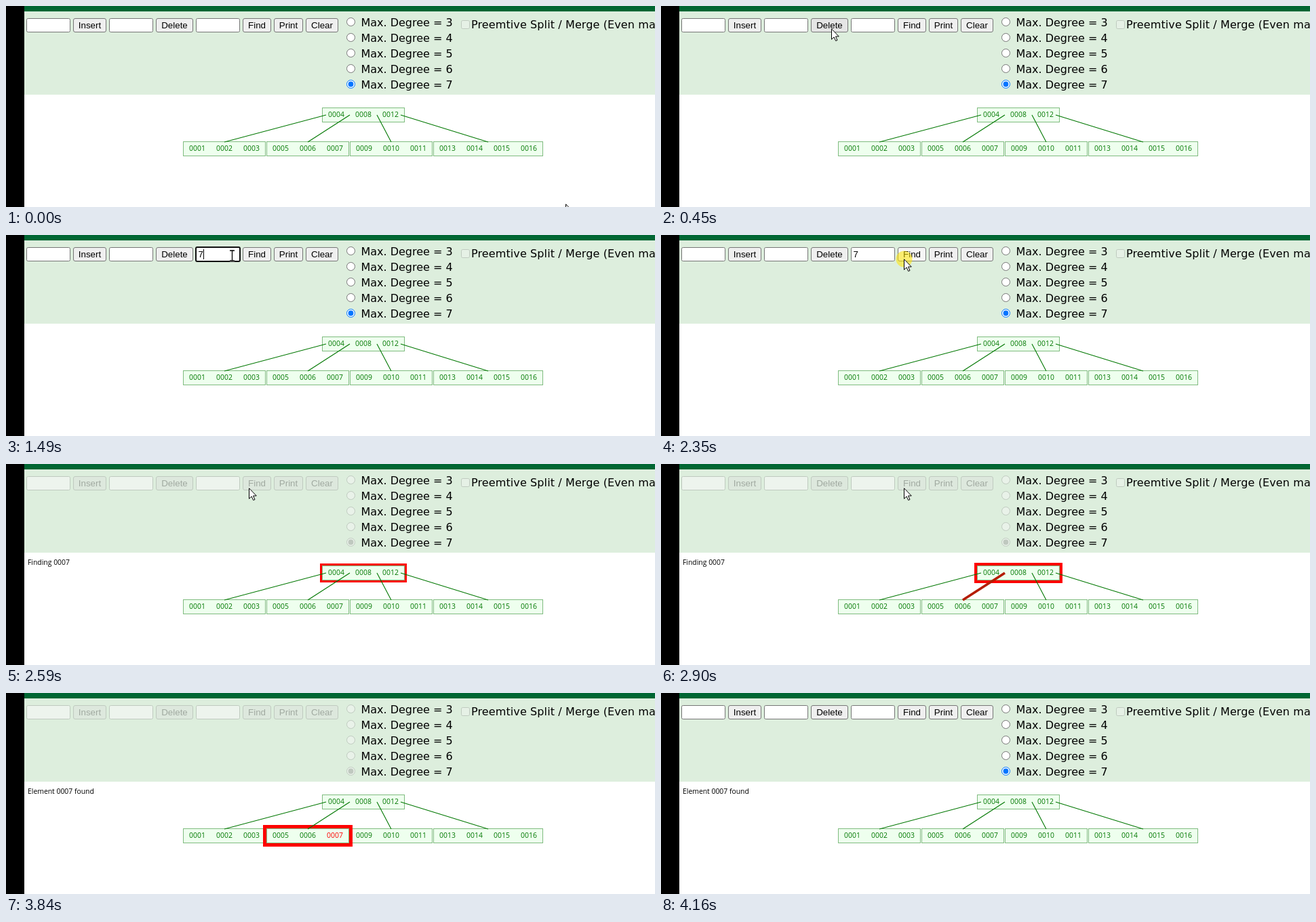
Animation of 957x297 px, one loop 4.56 s. Source, as an HTML page:

```html
<!DOCTYPE html>
<html lang="en">
<head>
<meta charset="utf-8">
<title>B-tree search</title>
<style>
html, body { margin: 0; width: 100%; height: 100%; overflow: hidden; background: #fff; }
svg { display: block; }
.label { font: 16px "DejaVu Sans", sans-serif; fill: #000; }
.long { letter-spacing: .11px; }
.form { font: 13.333px "Liberation Sans", Arial, sans-serif; }
.tree { font: 10.4px "Open Sans", sans-serif; }
.mid { text-anchor: middle; }
</style>
</head>
<body>
<svg id="stage" width="957" height="297" viewBox="0 0 957 297"></svg>
<script>
const stage = document.getElementById('stage');
const LOOP = 4560;
const FIND_START = 2510, STEP = 375, ENABLED_AGAIN = 4160;

// The screen refreshes only at these moments.
const ticks = [0, 70, 150, 220, 300, 370, 440, 520, 600, 750, 850, 1320, 1490,
  2040, 2120, 2200, 2270, 2350, 2510, 2590, 2660, 2740, 2820, 2900, 2970,
  3060, 3140, 3220, 3290, 3380, 3460, 3540, 3600, 3680, 3760, 3840, 3920, 4000, 4070, 4160];

// Pointer path: time, x, y
const path = [[0, 826, 293], [150, 640, 180], [300, 330, 60], [370, 216, 30],
  [440, 252, 34], [520, 304, 35], [600, 333, 30], [1970, 333, 30], [2350, 359, 36],
  [3060, 359, 36], [3290, 410, 65], [3540, 520, 127]];

const inputs = [30, 152, 280];
const buttons = [['Insert', 99, 49], ['Delete', 221, 55], ['Find', 349, 42],
  ['Print', 395, 43], ['Clear', 442, 48]];

const root = { x: 466, y: 150, keys: [4, 8, 12] };
const leaves = [
  { x: 261, y: 200, keys: [1, 2, 3] },
  { x: 384, y: 200, keys: [5, 6, 7] },
  { x: 507, y: 200, keys: [9, 10, 11] },
  { x: 630, y: 200, keys: [13, 14, 15, 16] }
];
const edges = [[472, 322], [507, 445], [547, 568], [582, 711]];

const within = (t, from, to) => t >= from && t < to;
const rect = (x, y, w, h, fill, more = '') =>
  `<rect x="${x}" y="${y}" width="${w}" height="${h}" fill="${fill}" ${more}/>`;
const circle = (x, y, r, fill, more = '') =>
  `<circle cx="${x}" cy="${y}" r="${r}" fill="${fill}" ${more}/>`;
const text = (x, y, str, cls, fill = '#000') =>
  `<text x="${x}" y="${y}" class="${cls}" fill="${fill}">${str}</text>`;
const box = (x, y, w, h, fill, stroke, r = 0) =>
  rect(x + .5, y + .5, w - 1, h - 1, fill, `stroke="${stroke}" rx="${r}"`);
const line = (x1, x2, color, width) =>
  `<line x1="${x1}" y1="161" x2="${x2}" y2="201" stroke="${color}" stroke-width="${width}"/>`;

function pointerAt(t) {
  let i = 0;
  while (i < path.length - 2 && path[i + 1][0] <= t) i++;
  const [t0, x0, y0] = path[i], [t1, x1, y1] = path[i + 1];
  const k = Math.min(1, (t - t0) / (t1 - t0));
  return { x: Math.round(x0 + (x1 - x0) * k), y: Math.round(y0 + (y1 - y0) * k) };
}

const over = (p, x, w) => p.x >= x && p.x < x + w && p.y >= 18 && p.y < 39;

function drawForm(t, p) {
  const off = within(t, FIND_START, ENABLED_AGAIN);
  const edge = off ? '#bfcabf' : '#767676';
  let s = '';
  for (const x of inputs) s += box(x, 18, 65, 21, off ? '#edf4ed' : '#fff', edge, 2);
  for (const [name, x, w] of buttons) {
    let fill = '#efefef';
    if (off) fill = '#dde8dd';
    else if (within(t, 2350, FIND_START) && name === 'Find') fill = '#f5f5f5';
    else if (t < FIND_START && over(p, x, w)) fill = '#e5e5e5';
    s += box(x, 18, w, 21, fill, edge, 2.5);
    s += text(x + w / 2, 33, name, 'form mid', off ? '#a0a9a0' : '#000');
  }
  if (within(t, 750, 2350)) {
    s += rect(280, 18, 65, 21, '#fff', 'stroke="#101010" stroke-width="2" rx="2"');
    if (within(t, 750, 1320)) s += rect(284, 21, 1, 15, '#000');
    if (within(t, 1490, 2040)) s += rect(291, 21, 1, 15, '#000');
  }
  if (within(t, 1490, FIND_START)) s += text(283.5, 33, '7', 'form');

  for (let i = 0; i < 5; i++) {
    const y = 23.5 + 23 * i, on = i === 4;
    const ring = off ? '#bfcabf' : on ? '#0075ff' : '#767676';
    s += circle(508.5, y, 6, off ? '#e9f2e9' : '#fff', `stroke="${ring}"`);
    if (on) s += circle(508.5, y, 3.9, off ? '#bfc8bf' : '#0075ff');
    s += text(523.4, 30 + 23 * i, 'Max. Degree = ' + (i + 3), 'label');
  }
  s += box(671, 21, 13, 13, '#e6f1e6', '#bfcabf', 2);
  return s + text(686, 33, 'Preemtive Split / Merge (Even max degree only)', 'label long');
}

function drawNode(node, glow, redKey) {
  const w = node.keys.length * 40 + 2;
  let s = '';
  if (glow) s += rect(node.x - glow, node.y - glow, w + 2 * glow, 22 + 2 * glow, '#f00');
  s += box(node.x, node.y, w, 22, '#efe', '#7fbb7f');
  node.keys.forEach((key, i) => {
    s += text(node.x + 21 + 40 * i, node.y + 14, String(key).padStart(4, '0'),
      'tree mid', key === redKey ? '#f00' : '#070');
  });
  return s;
}

function drawTree(t) {
  const phase = t < FIND_START ? -1 : Math.floor((t - FIND_START) / STEP);
  const pulse = Math.max(3, Math.round(7 - Math.abs(t - 3500) * .005));
  const inRoot = phase === 0 || phase === 1, inLeaf = phase === 2 || phase === 3;
  let s = drawNode(root, inRoot ? pulse : 0);
  for (const leaf of leaves) if (leaf !== leaves[1]) s += drawNode(leaf, 0);
  s += drawNode(leaves[1], inLeaf ? pulse : 0, phase === 3 ? 7 : 0);
  edges.forEach(([a, b], i) => {
    const hot = phase === 1 && i === 1;
    s += line(a, b, hot ? '#b41c00' : '#070', hot ? pulse - .4 : 1.1);
  });
  if (phase >= 0) s += text(32, 149, phase < 3 ? 'Finding 0007' : 'Element 0007 found', 'tree');
  return s;
}

function drawPointer(t, p) {
  if (t >= 3540) return '';
  let s = '';
  if (within(t, 750, 850) || within(t, 2350, FIND_START))
    s += circle(p.x - .5, p.y - .5, 12, '#ffe600', 'opacity=".55"');
  if (t < FIND_START && inputs.some(x => over(p, x, 65))) {
    const d = 'M-3.5 -7.5h3l.5 .5 .5 -.5h3M0 -7V7M-3.5 7.5h3l.5 -.5 .5 .5h3';
    return s + `<g transform="translate(${p.x + .5} ${p.y + .5})" fill="none">` +
      `<path d="${d}" stroke="#fff" stroke-width="2.6"/><path d="${d}" stroke="#000" stroke-width="1.3"/></g>`;
  }
  return s + `<path transform="translate(${p.x - 1} ${p.y - 1})" fill="#fff" stroke="#000"
    d="M.5 .8V16.3L4.1 12.9 6.7 18.5 9 17.5 6.5 12H11.3Z"/>`;
}

function draw(t) {
  const p = pointerAt(t);
  stage.innerHTML = rect(0, 0, 957, 297, '#fff') + rect(27, 8, 930, 123, '#ded') +
    rect(27, 0, 930, 8, '#063') + rect(0, 0, 27, 297, '#000') +
    drawForm(t, p) + drawTree(t) + drawPointer(t, p);
}

const start = performance.now();
let shown = -1;
function frame() {
  const now = (performance.now() - start) % LOOP;
  const tick = ticks.filter(v => v <= now).pop();
  if (tick !== shown) draw(shown = tick);
  requestAnimationFrame(frame);
}
frame();
</script>
</body>
</html>
```
